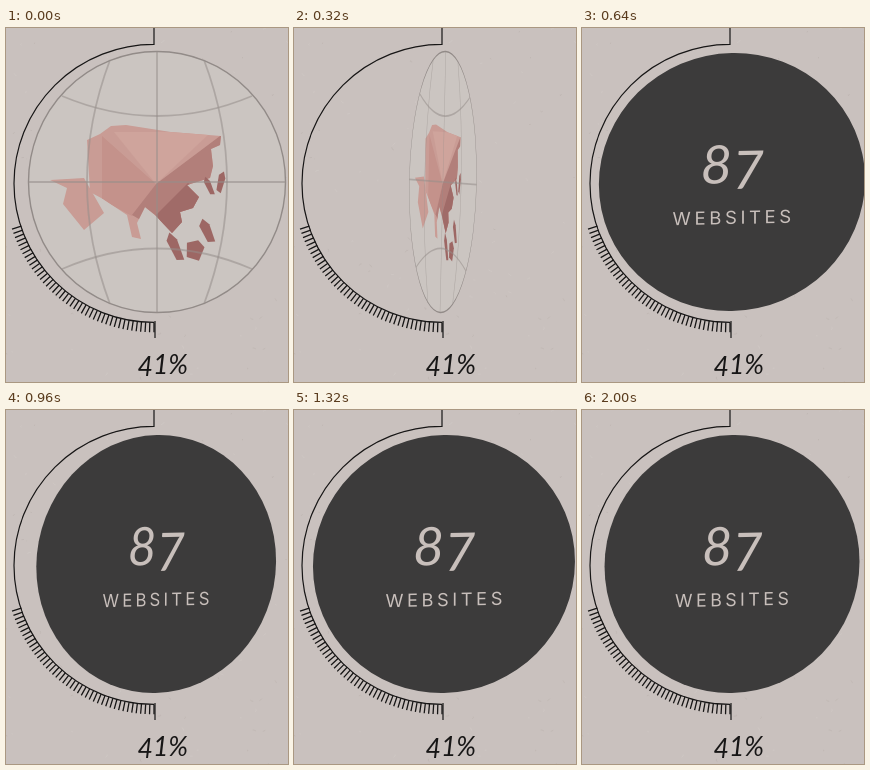
An HTML page for the animation above (2.08 s loop, 282 by 354 pixels).

```html
<!DOCTYPE html>
<html lang="en">
<head>
<meta charset="utf-8">
<style>
html, body { margin: 0; width: 100%; height: 100%; overflow: hidden; background: #c9c1be; }
svg { display: block; }
.num { font-family: Lato, "Open Sans", sans-serif; font-style: italic; }
.label { font: 400 18px Inter, "Open Sans", sans-serif; letter-spacing: 3.5px; }
</style>
</head>
<body>
<svg width="282" height="354" viewBox="0 0 282 354">
  <defs>
    <path id="coast" d="M81 112 94 106 105 98 120 97 165 104 215 108 214 117 205 121 207 138 204 150 181 157 193 169 187 180 174 184 176 194 166 205 149 187 139 179 131 195 135 211 126 209 121 187 97 171 84 164Z"/>
    <clipPath id="mainland"><use href="#coast"/></clipPath>
  </defs>
  <rect width="282" height="354" fill="#c9c1be"/>
  <g id="grain" fill="none" stroke-width=".8" opacity=".5"></g>

  <g fill="none" stroke="#171616">
    <path d="M148 0V16.4A140 139 0 0 0 148 294.4M149 293V310" stroke-width="1.2"/>
    <path id="comb" stroke-width="1.3"/>
  </g>
  <text class="num" x="131.5" y="346" font-size="26.5" fill="#171616"><tspan dy="2">4</tspan><tspan dy="-2">1%</tspan></text>

  <g id="globe">
    <g transform="translate(-151 -154)">
      <ellipse cx="151" cy="154" rx="128.5" ry="130.5" fill="#cbc5c1" stroke="#928b88" stroke-width="1.4"/>
      <path d="M44 152 78 150 98 185 78 202 57 176 61 160Z" fill="#c99c95"/>
      <use href="#coast" fill="#c99c95"/>
      <g clip-path="url(#mainland)">
        <path d="M108 104H205L150 156Z" fill="#cfa49c"/>
        <path d="M96 108 150 156 126 188 96 172Z" fill="#c4928b"/>
        <path d="M218 105 150 156 126 187 166 210 218 170Z" fill="#b27f7a"/>
        <path d="M150 187 182 155 200 170 166 210Z" fill="#a06b68"/>
      </g>
      <g id="islands" fill="#9d6764"></g>
      <g fill="none" stroke="#968e8a" stroke-opacity=".55" stroke-width="1.8">
        <path d="M22 154H280M151 23V285"/>
        <path d="M104 32Q58 154 104 276M198 32Q244 154 198 276"/>
        <path d="M56 68Q151 108 246 68M56 241Q151 200 246 241"/>
      </g>
    </g>
  </g>

  <g id="disc" fill="#c8bfbb">
    <circle r="129" fill="#3c3b3b"/>
    <text class="num" x="-30.5" y="1" font-size="53">8<tspan dy="6">7</tspan></text>
    <text class="label" x="1.7" y="42" text-anchor="middle">WEBSITES</text>
  </g>
</svg>
<script>
const $ = id => document.getElementById(id);
const addPath = (parent, attrs) => {
  const node = document.createElementNS("http://www.w3.org/2000/svg", "path");
  for (const key in attrs) node.setAttribute(key, attrs[key]);
  parent.append(node);
};

// Faint paper fibres
let seed = 7;
const rand = () => (seed = seed * 16807 % 2147483647) / 2147483647;
const spread = n => (rand() - .5) * n;
for (let i = 0; i < 110; i++) {
  const d = `M${rand() * 282} ${rand() * 354}q${spread(4)} ${spread(4)} ${spread(6)} ${spread(6)}`;
  addPath($("grain"), { d, stroke: rand() < .5 ? "#b5aca8" : "#d5cecb" });
}

// Ticks along the lower left of the arc
const TICKS = 43;
let comb = "";
for (let i = 0; i < TICKS; i++) {
  const a = Math.PI * (.5 + .4 * i / (TICKS - 1));
  const at = r => `${148 + r * Math.cos(a)} ${155 + r * Math.sin(a)}`;
  comb += `M${at(139.5)}L${at(149.3)}`;
}
$("comb").setAttribute("d", comb);

// One rough shard, placed, turned and stretched for each island
function island(x, y, w, h, turn) {
  const transform = `translate(${x} ${y}) rotate(${turn}) scale(${w} ${h})`;
  addPath($("islands"), { transform, d: "M-.5-.3 .1-.5 .5-.2 .3 .5-.4 .4Z" });
}
island(169, 219, 10, 31, -25);
island(189, 222, 18, 20, 8);
island(201, 203, 10, 26, -25);
island(203, 158, 6, 20, -25);
island(215, 154, 7, 22, 12);

const LOOP = 2080, STEP = 40, SWAP = 375, PEAK = 655;

// Horizontal half-width of the front side, then of the back side with its wobble
const frontWidth = t => 1 - Math.max(0, (t - 40) / (SWAP - 40)) ** 1.69;
const backWidth = t => {
  if (t < PEAK) return 134 * (1 - Math.cos(Math.PI * (t - SWAP) / (PEAK - SWAP))) / 2;
  const s = t - PEAK;
  return 126.4 + 7.6 * Math.exp(-.0005 * s) * Math.cos(2 * Math.PI * s / 610);
};

function pose(id, scale, tilt, x) {
  const lean = -.022 * Math.max(0, 1 - scale ** 4);
  $(id).setAttribute("transform", `matrix(${scale} ${tilt} ${lean} 1 ${x} 154)`);
}

function draw(now) {
  const t = Math.floor(now % LOOP / STEP) * STEP;
  const front = t < SWAP;
  $("globe").style.display = front ? "" : "none";
  $("disc").style.display = front ? "none" : "";
  if (front) {
    const s = frontWidth(t);
    pose("globe", s, .02 * (1 - s ** 4), 148.9 + 2.1 * s ** 9);
  } else {
    const s = backWidth(t) / 129;
    pose("disc", s, -.02, 152.5 - 2.5 * s);
  }
}

const start = performance.now();
function loop() {
  draw(performance.now() - start);
  requestAnimationFrame(loop);
}
loop();
</script>
</body>
</html>
```
